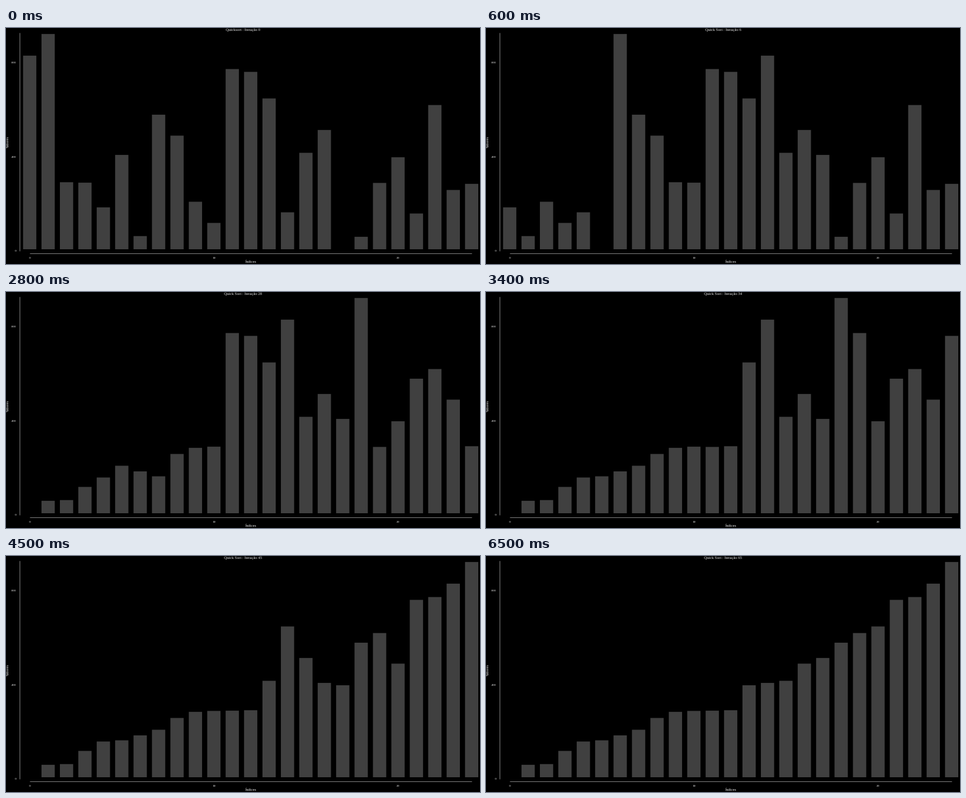
A matplotlib script for the animation above (6.6 s loop, 800 by 400 pixels).

```python
import matplotlib.pyplot as plt
from matplotlib.animation import FuncAnimation

W, H, DPI = 800, 400, 100
BAR, AXIS, TEXT = "#404040", "#808080", "#f2f2f2"
VALUES = [828, 920, 290, 288, 183, 406, 61, 577, 488, 207, 117, 771, 759,
          646, 162, 415, 512, 5, 58, 287, 396, 157, 618, 257, 283]
FIRST, PITCH, BAR_W = 40, 31.08, 22.4
FLOOR = 375

plt.rcParams["font.family"] = "Liberation Serif"


def x_pos(i):
    return FIRST + PITCH * i


def y_pos(v):
    return 377 - 0.39875 * v


def quicksort(a, lo, hi):
    """Lomuto quicksort that yields the list after every swap."""
    if lo >= hi:
        return
    i = lo
    for j in range(lo, hi):
        if a[j] < a[hi]:
            a[i], a[j] = a[j], a[i]
            i += 1
            yield a[:]
    a[i], a[hi] = a[hi], a[i]
    yield a[:]
    yield from quicksort(a, lo, i - 1)
    yield from quicksort(a, i + 1, hi)


steps = [VALUES] + list(quicksort(VALUES[:], 0, len(VALUES) - 1))

fig = plt.figure(figsize=(W / DPI, H / DPI), dpi=DPI, facecolor="black")
ax = fig.add_axes([0, 0, 1, 1])
ax.set(xlim=(0, W), ylim=(H, 0))
ax.axis("off")


def label(x, y, s, px, ha="center", **kw):
    return ax.text(x, y, s, fontsize=px * 72 / DPI, color=TEXT,
                   ha=ha, va="baseline", **kw)


def line(xs, ys):
    ax.plot(xs, ys, color=AXIS, lw=0.72, solid_capstyle="butt")


line([23, 23], [8, 377.5])
line([x_pos(0), x_pos(24)], [381.8, 381.8])
for v in (0, 400, 800):
    label(17.2, y_pos(v) + 2, str(v), 5.5, ha="right")
for i in (0, 10, 20):
    label(x_pos(i), 391, str(i), 5.5)
label(413, 398, "Índices", 6.67)
label(5.4, 193, "Valores", 6.67, rotation=90, rotation_mode="anchor")
title = label(400, 5.2, "", 6.67)

bars = ax.bar([x_pos(i) for i in range(len(VALUES))], 0, width=BAR_W,
              bottom=FLOOR, color=BAR, linewidth=0, snap=False)
ax.set(xlim=(0, W), ylim=(H, 0))


def draw(n):
    for bar, v in zip(bars, steps[n]):
        bar.set_height(y_pos(v) - FLOOR)
    name = "Quick Sort" if n else "Quicksort"
    title.set_text(f"{name} : Iteração {n}")
    return [*bars, title]


anim = FuncAnimation(fig, draw, frames=len(steps), interval=100,
                     repeat=True, repeat_delay=0)
plt.show()
```
